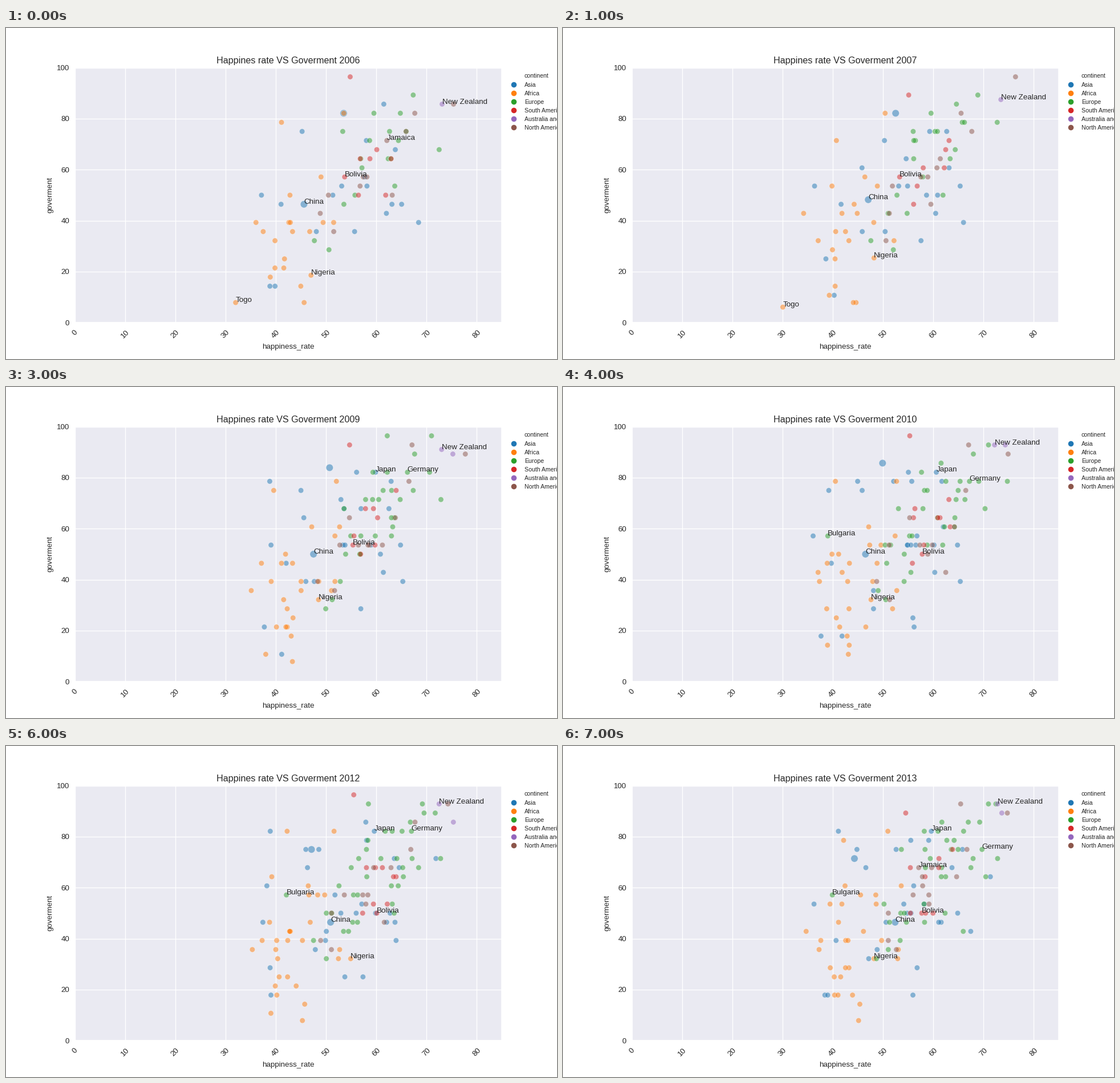
A matplotlib script for the animation above (8000 ms loop, 966 by 580 pixels).

```python
import matplotlib.pyplot as plt
import numpy as np
from matplotlib.animation import FuncAnimation

W, H, DPI = 966, 580, 100
K = 0.966                      # point sizes relative to a 10 x 6 inch page
INK, PANEL = "#262626", "#eaeaf2"
FIRST_YEAR = 2006
SMALL, BIG = 9.4, 12.5         # dot diameters in pixels
STEP = 100 / 28                # scores come in 28ths
FLOOR = 2.2                    # the usual lowest score, in 28ths

# label, color, (fewest, most) dots, happiness (low, mode, high),
# mean score in 28ths, score gained per happiness point, score noise
REGIONS = {
    "asia": ("Asia", "#1f77b4", (18, 27), (36, 50, 74), 13, 0.15, 5.5),
    "africa": ("Africa", "#ff7f0e", (19, 29), (33, 42, 56), 11, 0.1, 5.5),
    "europe": ("Europe", "#2ca02c", (18, 35), (42, 62, 78), 18, 0.5, 3),
    "south": ("South America", "#d62728", (7, 9), (52, 60, 70), 18.5, 0.5, 3),
    "oceania": ("Australia and Oceania", "#9467bd", (0, 1), (73, 74, 75), 25, 0, 0),
    "north": ("North America", "#8c564b", (10, 13), (46, 60, 76), 18, 0.5, 2.5),
}
HOME = {
    "Togo": "africa", "Nigeria": "africa", "China": "asia", "India": "asia",
    "Japan": "asia", "Bolivia": "south", "Jamaica": "north",
    "New Zealand": "oceania", "Germany": "europe", "Bulgaria": "europe",
}
GIANTS = {"China", "India"}
UNLABELLED = {"India"}

# Key countries: (happiness, score in 28ths)
KEYS = {
    2006: {"Togo": (32, 2.2), "Nigeria": (47, 5.2), "China": (45.6, 13),
           "India": (53.5, 23), "Bolivia": (53.7, 16), "Jamaica": (62.1, 20),
           "New Zealand": (73.1, 24)},
    2008: {"Togo": (28.1, 1.2), "Nigeria": (49.4, 9), "China": (48.5, 14),
           "India": (51.5, 23), "Bolivia": (52.9, 16), "Japan": (59.1, 23),
           "Germany": (65.2, 24), "New Zealand": (73.8, 25)},
    2010: {"Nigeria": (47.6, 9), "China": (46.5, 14), "India": (49.9, 24),
           "Bolivia": (57.8, 14), "Japan": (60.6, 23), "Germany": (67.2, 22),
           "Bulgaria": (39, 16), "New Zealand": (72.2, 26)},
    2011: {"Togo": (29.4, 2.2), "China": (50.4, 14), "India": (46.2, 21),
           "Bolivia": (57.8, 14), "Japan": (62.6, 23), "Germany": (66.2, 23),
           "Jamaica": (53.7, 18), "Bulgaria": (38.8, 16),
           "New Zealand": (71.9, 26)},
    2012: {"Nigeria": (54.9, 9), "China": (50.9, 13), "India": (47.1, 21),
           "Bolivia": (60.1, 14), "Japan": (59.6, 23), "Germany": (67, 23),
           "Bulgaria": (42.1, 16), "New Zealand": (72.5, 26)},
    2013: {"Nigeria": (48.2, 9), "China": (52.4, 13), "India": (44.3, 20),
           "Bolivia": (57.7, 14), "Japan": (59.6, 23), "Germany": (69.7, 21),
           "Jamaica": (57.1, 19), "Bulgaria": (39.9, 16),
           "New Zealand": (72.8, 26)},
}


def key_countries(year):
    """Known places, or the mean of both neighbouring years."""
    if year in KEYS:
        return KEYS[year]
    before, after = KEYS[year - 1], KEYS[year + 1]
    return {name: tuple(np.mean([before[name], after[name]], axis=0))
            for name in before if name in after}


def crowd(region, year):
    """Unnamed countries: a fixed seeded cloud that shifts a little each year."""
    _, _, (fewest, most), span, mean, slope, noise = REGIONS[region]
    seed = list(REGIONS).index(region)
    base, drift = np.random.default_rng(seed), np.random.default_rng([seed, year])
    happy = base.triangular(*span, most)
    score = mean + slope * (happy - np.mean(span)) + base.normal(0, noise, most)
    happy += drift.normal(0, 1.2, most)
    score += drift.normal(0, 1, most)
    count = round(np.interp(year, (FIRST_YEAR, FIRST_YEAR + 5), (fewest, most)))
    score = np.clip(np.round(score), FLOOR, 27)
    return list(zip(happy[:count], score[:count]))


def to_points(px):
    return px * 72 / DPI


plt.rcParams.update({
    "font.family": "Liberation Sans", "font.size": 10 * K,
    "text.color": INK, "axes.labelcolor": INK,
    "xtick.color": INK, "ytick.color": INK,
    "xtick.major.size": 3.5 * K, "ytick.major.size": 3.5 * K,
    "xtick.major.pad": 4.5 * K, "ytick.major.pad": 3.5 * K,
    "axes.labelpad": 4 * K, "axes.titlepad": 5.4 * K,
    "axes.facecolor": PANEL, "axes.edgecolor": "white",
    "axes.linewidth": 1.25 * K, "axes.axisbelow": True,
    "grid.color": "white", "grid.linewidth": K,
})

fig, ax = plt.subplots(figsize=(W / DPI, H / DPI), dpi=DPI, facecolor="white")
ax.set(xlim=(0, 85), ylim=(0, 100), ylabel="goverment")
ax.set_xlabel("happiness_rate", labelpad=5 * K)
ax.set_xticks(range(0, 90, 10))
ax.tick_params(axis="x", rotation=45)
ax.tick_params(bottom=False, left=False)
ax.grid(True)
title = ax.set_title("")
dots = ax.scatter([], [], linewidths=0.5, edgecolors="white")
labels = {name: ax.text(0, 0, name) for name in HOME if name not in UNLABELLED}

# Legend on a page-wide layer measured in pixels; long entries run off the edge.
page = fig.add_axes([0, 0, 1, 1])
page.set(xlim=(0, W), ylim=(H, 0))
page.axis("off")
page.text(908.7, 87.3, "continent", fontsize=7.85 * K)
for row, (name, color, *_) in enumerate(REGIONS.values()):
    y = 99.4 + 15 * row
    page.plot(890, y, "o", color=color, ms=to_points(9.6), mew=0)
    page.text(909.3, y + 3.5, name, fontsize=7.85 * K)


def draw(step):
    year = FIRST_YEAR + step
    named = key_countries(year)
    title.set_text(f"Happines rate VS Goverment {year}")
    spots, sizes, colors = [], [], []
    for region, (_, color, *_) in REGIONS.items():
        own = [(spot, BIG if name in GIANTS else SMALL)
               for name, spot in named.items() if HOME[name] == region]
        rest = [(spot, SMALL) for spot in crowd(region, year)]
        for (happy, score), width in own + rest:
            spots.append((happy, score * STEP))
            sizes.append(to_points(width) ** 2)
            colors.append(color)
    dots.set_offsets(spots)
    dots.set_sizes(sizes)
    dots.set_facecolor(colors)
    dots.set_alpha(0.5)
    for name, label in labels.items():
        label.set_visible(name in named)
        if name in named:
            happy, score = named[name]
            label.set_position((happy, score * STEP + 0.2))
    return [title, dots, *labels.values()]


anim = FuncAnimation(fig, draw, frames=8, interval=1000,
                     init_func=lambda: draw(0), repeat=True, repeat_delay=0)
plt.show()
```
